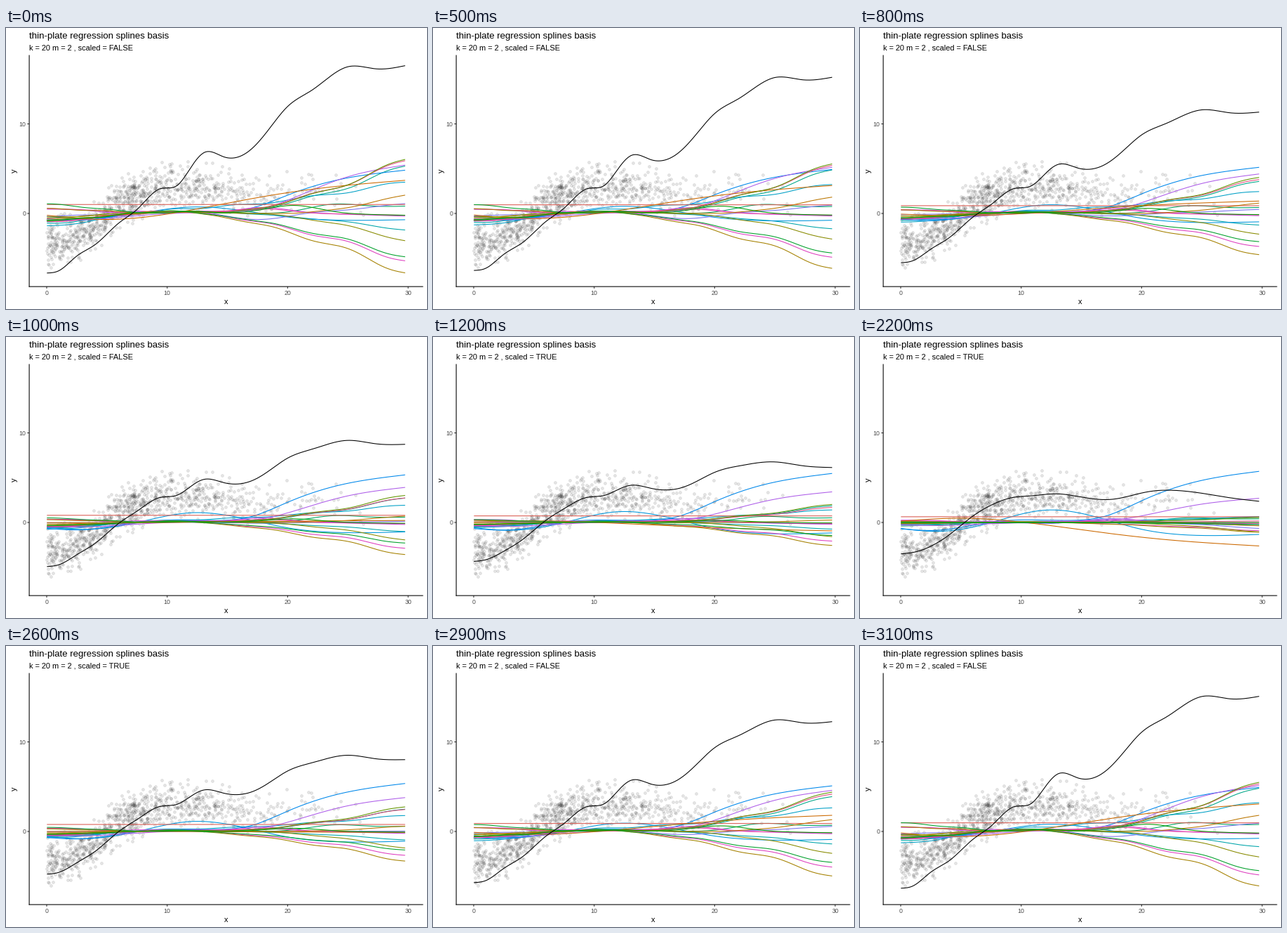
Animation, 600 px wide and 400 px high, one loop 3.2 s. Source, as a matplotlib script:

```python
import numpy as np
import matplotlib.pyplot as plt
from matplotlib.animation import FuncAnimation

W, H, DPI = 600, 400, 100
PX = 72 / DPI  # points per pixel
LINE = 1.07 * PX
END = 29.75

plt.rcParams["font.family"] = "Liberation Sans"
rng = np.random.default_rng(7)
grid = np.linspace(.02, END, 400)


def px(x):
    return 58 + 17.17 * np.asarray(x)


def py(y):
    return 264 - 12.75 * np.asarray(y)


def hcl(hue, chroma=100, light=55):
    """Polar LUV colour as clipped sRGB."""
    y = ((light + 16) / 116) ** 3
    u = chroma * np.cos(np.radians(hue)) / (13 * light) + .1978
    v = chroma * np.sin(np.radians(hue)) / (13 * light) + .4683
    x = 9 * y * u / (4 * v)
    z = y * (12 - 3 * u - 20 * v) / (4 * v)
    rgb = np.array([3.2406 * x - 1.5372 * y - .4986 * z,
                    -.9689 * x + 1.8758 * y + .0415 * z,
                    .0557 * x - .2040 * y + 1.0570 * z])
    rgb = np.clip(rgb, 0, 1)
    return np.clip(np.where(rgb < .0031, 12.92 * rgb,
                            1.055 * rgb ** (1 / 2.4) - .055), 0, 1)


def spline(points, x):
    """Natural cubic spline through a few key points."""
    xk, yk = np.array(points, float).T
    n = len(xk)
    h = np.diff(xk)
    slope = np.diff(yk) / h
    a, b = np.eye(n), np.zeros(n)
    for i in range(1, n - 1):
        a[i, i - 1:i + 2] = h[i - 1], 2 * (h[i - 1] + h[i]), h[i]
        b[i] = 6 * (slope[i] - slope[i - 1])
    m = np.linalg.solve(a, b)
    i = np.clip(np.searchsorted(xk, x) - 1, 0, n - 2)
    t = x - xk[i]
    return (yk[i] + t * (slope[i] - h[i] * (2 * m[i] + m[i + 1]) / 6)
            + t ** 2 * m[i] / 2 + t ** 3 * (m[i + 1] - m[i]) / (6 * h[i]))


def hump(center, width):
    return np.exp(-((grid - center) / width) ** 2)


def basis(left, start, end, peak=0, at=20):
    """Fades out from the left, then grows from start towards end."""
    u = np.clip((grid - start) / (END - start), 0, 1)
    wave = np.sin(2 * np.pi * (grid - 23.3) / 6.4)
    tail = end * (u ** 1.6 - .05 * u * wave)
    ripple = .1 * np.sin(1.2 * grid + rng.uniform(0, 2 * np.pi))
    middle = ripple * hump(8, 7) + .2 * hump(11, 4)
    return left * hump(0, 5) + tail + middle + peak * hump(at, 3)


# Hue number: (weight after scaling, basis function)
BASES = {
    0: (.6, np.ones_like(grid)),
    1: (-.88, spline([(0, -.2), (5, -.67), (11, .15), (17, 1.65),
                      (22, 2.7), (END, 3.7)], grid)),
    12: (2, spline([(0, -.35), (3, -.52), (7, -.1), (12, .72), (17, .17),
                    (20, -.4), (24, -.74), (END, -.7)], grid)),
    13: (1.2, spline([(0, -.6), (3, -.74), (8, .1), (14, .2), (17, .6),
                      (20, 2.05), (24, 3.7), (END, 4.83)], grid)),
    15: (.45, spline([(0, -.6), (3, -.7), (8, -.2), (14, .15), (18, .6),
                      (22, 2.6), (25, 4.1), (END, 5.4)], grid)),
    # rising
    2: (-.3, basis(-.5, 20, 2.05)),
    5: (0, basis(-.7, 14, 6.05)),
    9: (.03, basis(-.9, 14, 5.3)),
    11: (.1, basis(-1.4, 6, 3.5)),
    19: (-.07, basis(-.9, 13.5, 5.9)),
    # level
    6: (-.1, basis(-.8, 20, -.2, .9, 20.5)),
    8: (.45, basis(-.8, 18, .8, .8, 24)),
    14: (-.77, basis(-.3, 19, 1.1, -.7, 17.5)),
    16: (.5, basis(.5, 20, -.3, .65, 18)),
    18: (.3, basis(.55, 20, -.2, .5, 18)),
    # falling
    3: (.08, basis(.55, 11, -6.65)),
    4: (.28, basis(-.4, 17, -3.05)),
    7: (-.05, basis(1.05, 11, -4.85)),
    10: (.1, basis(-1.1, 15, -1.85)),
    17: (.09, basis(-.9, 11, -5.3)),
}
RAW = [(0, -6.65), (1, -6.4), (2.5, -4.75), (4, -3.5), (6, -1.05), (7.5, .45),
       (9.4, 2.75), (10.8, 3.1), (12, 5.2), (13.1, 6.82), (14.7, 6.32),
       (17, 7.2), (18.5, 9.5), (20, 11.95), (22, 13.75), (25, 16.38),
       (27.3, 16.15), (END, 16.5)]
FIT = [(0, -3.2), (2, -2.72), (4, -1.2), (6, .9), (8, 2.35), (11.5, 2.95),
       (15, 2.5), (17.5, 2.05), (21.3, 2.6), (25, 1.95), (END, .95)]

# Greens lie on top of the bundle, the sum on top of all.
curves = [(hcl(15 + 18 * i), BASES[i][1], BASES[i][0] * BASES[i][1])
          for i in np.roll(np.arange(20), -8)]
curves.append(("black", spline(RAW, grid), spline(FIT, grid)))

fig = plt.figure(figsize=(W / DPI, H / DPI), dpi=DPI, facecolor="white")
ax = fig.add_axes([0, 0, 1, 1])
ax.set_xlim(0, W)
ax.set_ylim(H, 0)
ax.axis("off")


def stroke(xs, ys, color, z=2):
    return ax.plot(xs, ys, color=color, lw=LINE, zorder=z, snap=False,
                   solid_capstyle="butt", solid_joinstyle="round")[0]


def label(x, y, text, size, color="black", **kw):
    return ax.text(x, y, text, fontsize=size * PX, color=color, **kw)


# Observations
obs_x = np.abs(rng.normal(7.5, 7.3, 950))
obs_x = obs_x[obs_x < 29.3]
noise = np.clip(rng.normal(0, 1.15, obs_x.size), -2.9, 2.9)
ax.scatter(px(obs_x), py(spline(FIT, obs_x) + noise),
           s=(3.9 * PX) ** 2, lw=.7 * PX, facecolors=(0, 0, 0, .1),
           edgecolors=(0, 0, 0, .1), zorder=1)

# Axes
stroke([33.1, 33.1], [38.5, 368.6], "black", 4)
stroke([32.6, 594.5], [368.1, 368.1], "black", 4)
for v in (0, 10, 20, 30):
    stroke([px(v)] * 2, [368.1, 370.9], "#333333", 3)
    label(px(v), 380, str(v), 8.8, "#4D4D4D", ha="center")
for v in (0, 10):
    stroke([30.3, 33.1], [py(v)] * 2, "#333333", 3)
    label(28.3, py(v) + 3.2, str(v), 8.8, "#4D4D4D", ha="right")
label(313.7, 393, "x", 11, ha="center")
label(11.5, 203.7, "y", 11, ha="center", va="center", rotation=90)
label(33, 15, "thin-plate regression splines basis", 13.2)
subtitle = label(33, 31.6, "", 11)

lines = [stroke(px(grid), py(raw), color) for color, raw, _ in curves]


def update(n):
    mix = np.interp(n, [4, 16, 21, 32], [0, 1, 1, 0])
    for line, (_, raw, scaled) in zip(lines, curves):
        line.set_ydata(py(raw + mix * (scaled - raw)))
    state = "TRUE" if 11 <= n < 28 else "FALSE"
    subtitle.set_text(f"k = 20 m = 2 , scaled = {state}")
    return [*lines, subtitle]


anim = FuncAnimation(fig, update, frames=32, interval=100, repeat=True,
                     repeat_delay=0, blit=False)
plt.show()
```
